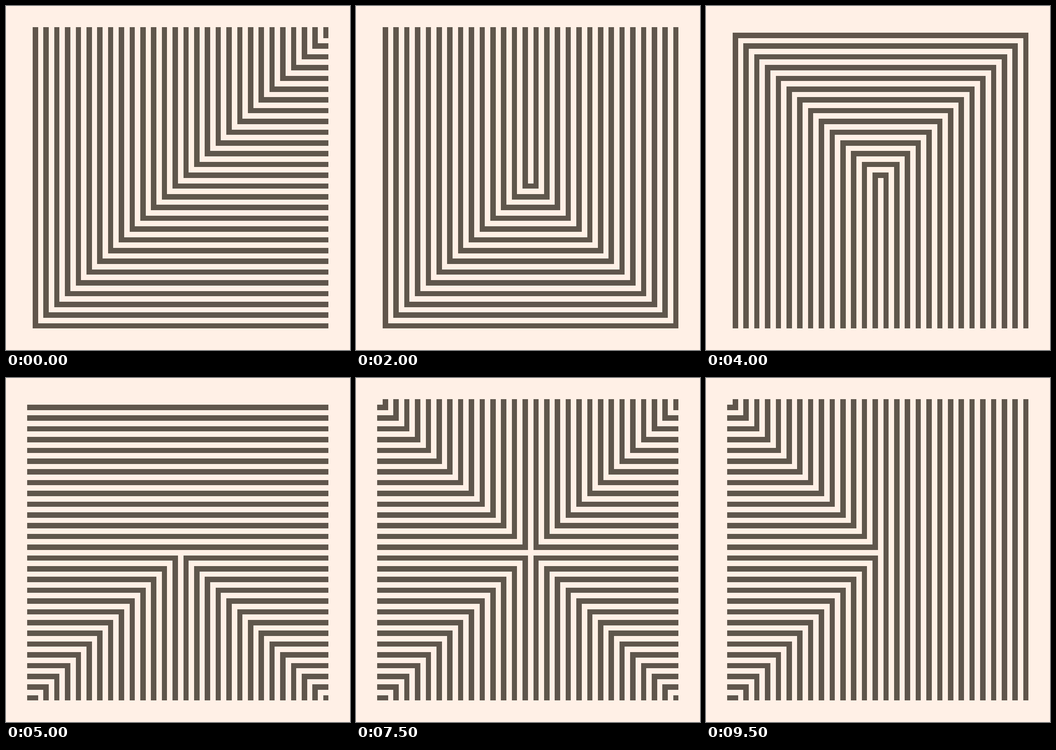
Write an HTML page with a canvas that moves like this. It is 748 px wide and 748 px high and loops after 10000 ms.

```html
<!DOCTYPE html>
<html lang="en">
<head>
<meta charset="utf-8">
<title>Stripe wedges</title>
<style>
  html, body { margin: 0; width: 100%; height: 100%; overflow: hidden; background: #fff0e6; }
  canvas { display: block; width: 748px; height: 748px; }
</style>
</head>
<body>
<canvas id="stage" width="748" height="748"></canvas>
<script>
const STEP = 500;
const PAPER = '#fff0e6';
const INK = '#5f564c';
const HALF = 28;

// Direction of the top, right, bottom and left wedge: 1 = horizontal stripes, 0 = vertical.
const STATES = [
  '0110', '1101', '1001', '0101', '0010',
  '0100', '1000', '1011', '1000', '0001',
  '1101', '0101', '0011', '1110', '1100',
  '0101', '0010', '1101', '0100', '0001'
];

const ctx = document.getElementById('stage').getContext('2d');
const edge = k => Math.round(373.85 + 11.7 * k);
const odd = n => (n & 1) === 1;

function wedge(x, y) {
  if (Math.abs(y) > Math.abs(x)) return y < 0 ? 0 : 2;
  return x > 0 ? 1 : 3;
}

function draw(state) {
  ctx.fillStyle = PAPER;
  ctx.fillRect(0, 0, 748, 748);
  ctx.fillStyle = INK;
  for (let y = -HALF; y < HALF; y++) {
    for (let x = -HALF; x < HALF; x++) {
      const across = state[wedge(x, y)] === '1';
      if (!odd(across ? y : x)) continue;
      const left = edge(x), top = edge(y);
      ctx.fillRect(left, top, edge(x + 1) - left, edge(y + 1) - top);
    }
  }
}

const start = performance.now();
let shown = -1;

function tick() {
  const t = Math.max(0, performance.now() - start);
  const i = Math.floor(t / STEP) % STATES.length;
  if (i !== shown) draw(STATES[shown = i]);
  requestAnimationFrame(tick);
}
tick();
</script>
</body>
</html>
```
